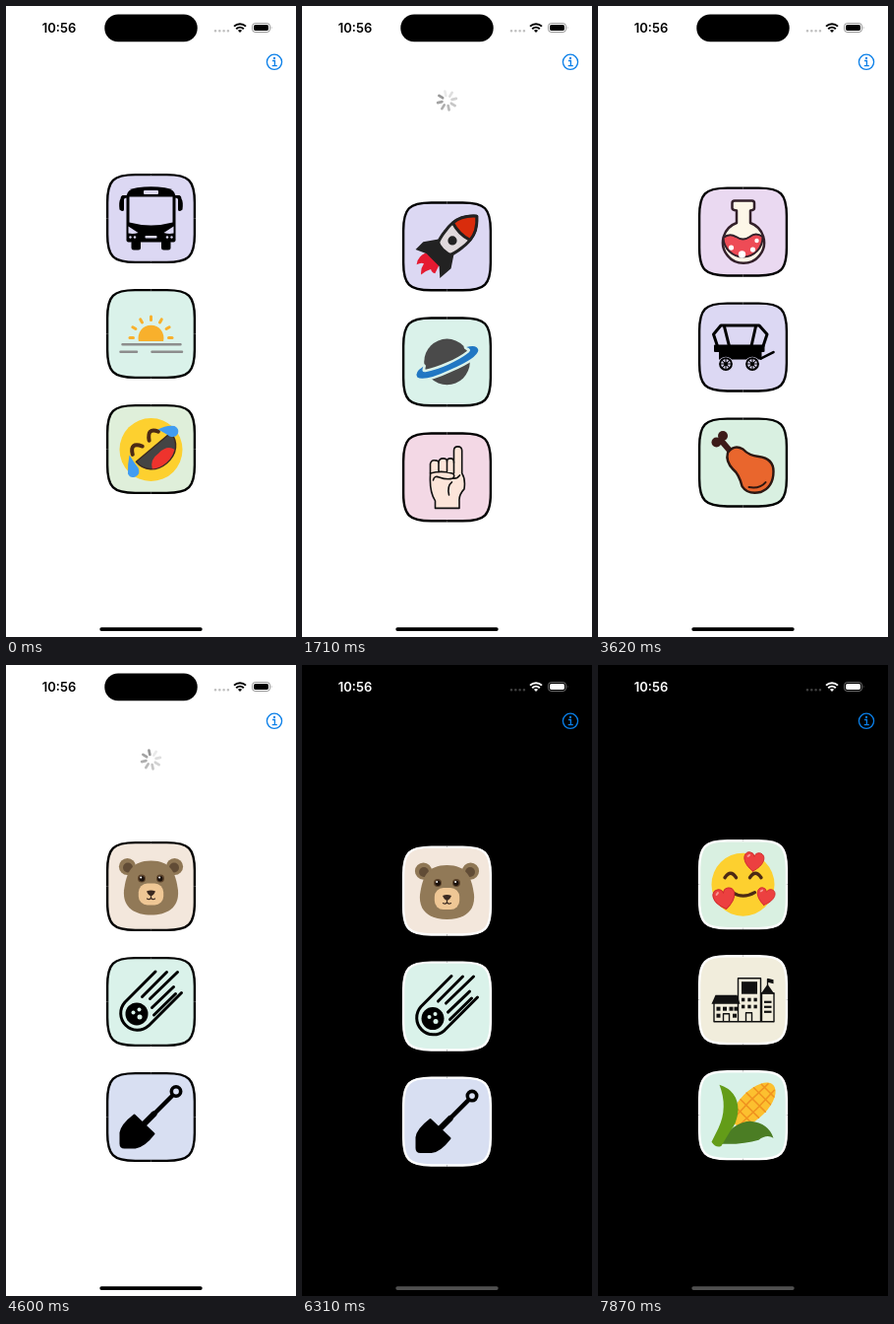
Recreate the animation shown at these times as an HTML page. Size 295 by 640 pixels, loop 7.99 s.

```html
<!DOCTYPE html>
<html lang="en">
<head>
<meta charset="utf-8">
<title>Story dice</title>
<style>
  html, body { margin: 0; width: 100%; height: 100%; overflow: hidden; background: var(--bg); }
  svg { display: block; width: 100vw; height: 100vh; }
  .ink { fill: var(--ink); }
  .line { fill: none; stroke: var(--ink); }
  .round { stroke-linecap: round; stroke-linejoin: round; }
  text { font: 600 13px Inter, sans-serif; text-anchor: middle; }
</style>
</head>
<body>
<svg viewBox="0 0 295 640">
  <g id="spinner" stroke="#858585" stroke-width="2.7" stroke-linecap="round"></g>
  <g id="dice"></g>
  <text class="ink" x="54" y="26.6">10:56</text>
  <rect x="100.3" y="8.5" width="94.4" height="27.7" rx="13.8"/>
  <path class="line round" opacity=".25" stroke-width="2.6" d="M213 25.3h0M217.3 25.3h0M221.6 25.3h0M225.9 25.3h0"/>
  <path class="line" stroke-width="2" d="M232 20.6A8.6 8.6 0 0 1 244 20.6M234.2 23.2A5.5 5.5 0 0 1 241.8 23.2"/>
  <path class="ink" d="M235.9 24.8Q238 23 240.1 24.8L238 27Z"/>
  <rect class="line" opacity=".4" x="250.5" y="17.5" width="18" height="9" rx="3"/>
  <path class="ink" opacity=".4" d="M269.8 20.5Q271.3 22 269.8 23.5Z"/>
  <rect class="ink" x="252" y="19" width="15" height="6" rx="1.7"/>
  <g fill="none" stroke="#0a7fe8" stroke-width="1.3">
    <circle cx="273" cy="56.8" r="7.6"/>
    <path d="M271 55.5H273.4V60.6M270.7 60.7H275.8"/>
    <circle cx="273" cy="52.9" r=".5"/>
  </g>
  <rect id="home" x="95.3" y="630.2" width="104.4" height="3.8" rx="1.9"/>
</svg>
<script>
const $ = id => document.getElementById(id);
const clamp = v => Math.max(0, Math.min(1, v));

// Small SVG builders; every icon is drawn around the centre of its tile.
const fill = (color, d) => `<path fill="${color}" d="${d}"/>`;
const line = (color, width, d, inside = 'none') =>
  `<path class="round" fill="${inside}" stroke="${color}" stroke-width="${width}" d="${d}"/>`;
const dot = (color, x, y, r, ry = r) => `<ellipse fill="${color}" cx="${x}" cy="${y}" rx="${r}" ry="${ry}"/>`;
const ring = (color, width, x, y, r) =>
  `<circle fill="none" stroke="${color}" stroke-width="${width}" cx="${x}" cy="${y}" r="${r}"/>`;
const box = (color, x, y, w, h, r = 0) =>
  `<rect fill="${color}" x="${x}" y="${y}" width="${w}" height="${h}" rx="${r}"/>`;
const place = (x, y, angle, content) => `<g transform="translate(${x} ${y}) rotate(${angle})">${content}</g>`;
const mirror = content => content + `<g transform="scale(-1 1)">${content}</g>`;
const repeat = (n, make) => [...Array(n)].map((_, i) => make(i)).join('');

const lavender = '#dcd8f3', mint = '#daf2ea', green = '#d9f0e1', cream = '#f1eddc';

const bus = fill('#000', 'M-25-23Q-24-30-14-31.3Q0-33 14-31.3Q24-30 25-23V22Q25 24 23 24H-23Q-25 24-25 22Z')
  + fill(lavender, 'M-22-22H22V4Q0 10-22 4Z') + box(lavender, -7.5, -28.5, 15, 4, 1)
  + box(lavender, -6, 17.5, 12, 2.6, .8)
  + mirror(box('#000', -20, 22, 9.5, 10, 2.5) + fill(lavender, 'M-23 8L-13 14.5Q-18 16-23 15Z')
    + dot(lavender, -21, 19, 1.2) + dot(lavender, -16.5, 19, 1.2)
    + fill('#000', 'M-24-23.5H-29Q-31-23-31-20Q-33-17-32-9Q-28-6-27.5-9V-19Q-27.5-21-24-21Z'));

const sunrise = fill('#f8b02c', 'M-12.6 7.5A13 13 0 1 1 12.6 7.5Z')
  + repeat(7, i => place(0, 4, i * 30 - 90, line('#f8b02c', 3, 'M0-18V-21.5')))
  + line('#8d8d8d', 2.5, 'M-29 10.7H30M-31 18.2H-14.5M1 18.2H31.5');

const laugh = dot('#fdd02f', 0, .5, 32)
  + place(2.5, -2, -40,
    line('#3b2a22', 1.5, 'M-23 0H23C23 12 14 21 0 21S-23 12-23 0Z', '#444')
    + fill('#ee332d', 'M-15 16Q-11 7 0 8Q12 7 15 15.5Q8 20.5 0 20.5Q-9 20.5-15 16Z')
    + line('#4c2a15', 4, 'M1-8Q8-20 14-9M-21-8Q-15-20-8-8'))
  + fill('#419cf0', 'M7-20Q16-25 24-23.5Q29-21 27.5-16Q25-11 19-13Q15-16 7-20Z')
  + fill('#419cf0', 'M-22 6Q-24 16-23.5 25Q-21 30-16 28Q-10 25-13 19Q-17 14-22 6Z');

const rocket = place(5.5, -6, 45,
  fill('#e51a31', 'M-10 27Q-14 36-8.5 43Q-7 38-4 37Q-3 43 2 47Q2 41 5 36Q8 38 11 36L8 27Z')
  + line('#222', 3, 'M0-35C10-26 14-14 12-2Q11 8 7 16H-7Q-11 8-12-2C-14-14-10-26 0-35Z', '#e0d9dc')
  + line('#222', 3, 'M0-35C8-28 12-21 12.3-13Q0-9-12.3-13C-12-21-8-28 0-35Z', '#d92c0c')
  + fill('#222', 'M-11 9L-20 22L-20 33L-9 28H9L18 36L19 21L11 9Q0 15-11 9Z') + dot('#222', 0, 0, 4.6));

const band = 'M-24-5.5Q-35-4-34 2Q-30 9 0 8.5Q30 9 34 2Q35-4 24-5.5Q29-1 24 .5Q14 3 0 3Q-14 3-24 .5Q-29-1-24-5.5Z';
const planet = dot('#4a4a4a', 0, 0, 23.3) + place(0, 0, -24, line(mint, 5, band) + fill('#2177c3', band));

const hand = line('#111', 1.6, 'M-12 31.5V24Q-18 15-17-2V-13.5Q-16-18-12-17Q-9-17-8.5-15Q-8-19-4-19T0-16'
    + 'Q0-19 3.5-19T7-15V-27Q7-31 11-31T15.2-27V-4Q19 2 17.5 12Q12 18 12.5 24V31.5Z', '#fce5d9')
  + line('#111', 1.6, 'M-8.5-15V-5M0-16V-5M7-15V-4M-17-4Q-6-7 5-4Q9-2 6 1Q0 3-8 0Q-13-2-14 3M6 1Q10 2 13-2M5 5Q0 9 2 18');

const flask = line('#33202a', 2.5, 'M-6.5-21.5V-9A21 21 0 1 0 7.5-9V-21.5Q11.5-22 11.5-24V-29Q11.5-31.5 9-31.5'
    + 'H-8.5Q-11-31.5-11-29V-24Q-11-22-6.5-21.5Z', '#fdf7e8')
  + line('#33202a', 2, 'M-20 6Q-14 1-7 5Q0 10 7 5Q13 0 20 5A20 20 0 1 1-20 6Z', '#ee4b56')
  + dot('#fff', -12, 16, 2.6) + dot('#fff', -1, 23, 3.7) + dot('#fff', 10, 18, 2.6) + dot('#fff', 14, 9, 2.2);

const wheel = x => dot(lavender, x, 17, 7.4) + place(x, 17, 0, ring('#000', 2, 0, 0, 5.9) + dot('#000', 0, 0, 1.8)
  + line('#000', 1.1, 'M-6 0H6M0-6V6M-4-4L4 4M-4 4L4-4'));
const wagon = line('#000', 3, 'M-26-1L-30-13L-22.5-22H16.5L24.5-13L20.5-1M-19-21L-14-1M13-21L8.5-1')
  + box('#000', -29.5, -2.5, 51.5, 7.5, 1) + box('#000', -24.5, 4, 43.5, 8.5) + line('#000', 2.6, 'M18 11.5L31 5')
  + wheel(-17.5) + wheel(9.5);

const drumstick = line('#3d1b19', 6, 'M-10-8L-22-22') + dot('#3d1b19', -20.5, -27, 5) + dot('#3d1b19', -27, -20.5, 5)
  + line('#2c1712', 2.4, 'M-15.5-10Q-9-19 0-13.5Q6-7 16-6Q31-4 31 9Q31 25 18 30Q5 33-1 24Q-4 12-10 7Q-18-1-15.5-10Z', '#e9662d')
  + line('#2c1712', 2, 'M6 25Q17 27 23 20');

const bear = mirror(dot('#8f7755', -24, -20, 8.6) + dot('#614c36', -23.5, -19, 5))
  + fill('#917957', 'M0-26C20-26 25-14 27.5 4C29 22 16 29 0 29S-29 22-27.5 4C-25-14-20-26 0-26Z')
  + box('#efc795', -12.7, -3, 25.4, 22, 9)
  + mirror(dot('#5c432b', -9.5, -8, 4) + dot('#1c120c', -9.3, -7.8, 2.7)) + dot('#fff', -10.3, -9, 1) + dot('#fff', 8.6, -9, 1)
  + fill('#3a2920', 'M-4.5 5Q0 3 4.5 5Q3 9 0 10Q-3 9-4.5 5Z') + line('#3a2920', 1.2, 'M0 10V12M-4 12.5Q-2 14 0 12Q2 14 4 12.5');

const comet = line('#000', 3, 'M4.5-30.5L-26.5 .5A17 17 0 0 0-2.5 24.5L31-9M-9-5L16-30M-1-3L27-30M1 6L23-15M3 13.5L25-8')
  + dot('#000', -14.5, 12.5, 11.5) + dot(mint, -18, 11, 2) + dot(mint, -12, 8, 2) + dot(mint, -11.5, 15.5, 2.5);

const shovel = ring('#000', 3.6, 25.5, -26, 4.7) + line('#000', 4.5, 'M21-21L-7 7') + line('#000', 6, 'M3-3L-7 7')
  + line('#000', 2, 'M-17-2L3 17Q-7 30-16 31H-27Q-31 31-31 27V16Q-30 8-17-2Z', '#000');

const heart = (x, y, angle, size) => place(x, y, angle, `<g transform="scale(${size})">`
  + line('#cf2c2f', .9, 'M0 10C-14 1-11-9-5-9Q-1-9 0-5Q1-9 5-9C11-9 14 1 0 10Z', '#ec4040')
  + line('#f79a95', 1.8, 'M-6.5-4.5L-5-6') + '</g>');
const love = dot('#fdd02f', 0, 0, 32)
  + mirror(line('#4c2a15', 3.4, 'M-18.5-7Q-12.5-16-7-7')) + line('#4c2a15', 3.2, 'M-11 8Q0 15 12 8')
  + heart(11, -23.5, 6, 1) + heart(-19, 14, -10, 1.1) + heart(23, 12, 12, .9);

const grid = (xs, ys, w, h) => ys.flatMap(y => xs.map(x => box('#111', x, y, w, h))).join('');
const school = line('#111', 1.4, 'M-5 22V-22H18V22M19 22V-7H31.5V22M-29.5 3V22H31.5M3 22V13H9V22M-20 22V14H-14V22')
  + box('#111', -1.5, -18.5, 16, 12.5) + grid([-1.5, 4.8, 11], [-2, 5], 3.3, 3.6)
  + fill('#111', 'M-28-5H-6L-3 4H-32Z') + grid([-27, -20.5, -14, -9], [7], 4, 4) + grid([-27, -10.5], [14], 4, 4)
  + fill('#111', 'M18-6L25-16L32-6Z') + line('#111', 1.3, 'M25-15V-21') + fill('#111', 'M25-22L31-20.5V-16.5L25-18Z')
  + grid([21.5], [1, 6, 11], 7.5, 2.2);

const corn = place(11, -11, -45, dot('#fcc02f', 0, 0, 28, 14)
    + line('#f0921f', 1.5, 'M-26-4.5Q0-6 25-4.5M-26 4.5Q0 6 25 4.5M-15-11V11M-6-13V13M3-13.5V13.5M12-12V12M20-9V9'))
  + fill('#4b7d24', 'M-24 29Q-10 6 8 6Q26 8 31 23Q24 19 16 25Q0 30-24 29Z')
  + fill('#639c18', 'M-24-31Q-5-25-5-5Q-6 8-13 16L-22 31Q-27 34-32 27L-25 13Q-15-8-24-31Z');

const sets = [
  [[lavender, bus], [mint, sunrise], ['#dfefda', laugh]],
  [[lavender, rocket], [mint, planet], ['#f3d8e5', hand]],
  [['#ead9f1', flask], [lavender, wagon], [green, drumstick]],
  [['#f3e7dc', bear], [mint, comet], ['#d8dff2', shovel]],
  [[green, love], [cream, school], ['#d8f1e8', corn]]
];
const corner = 'M0-44.4H16C38.5-44.4 44.4-38.5 44.4-16V0';
const squircle = repeat(4, i => place(0, 0, i * 90, `<path class="line" stroke-width="2.4" d="${corner}"/>`));
$('dice').innerHTML = sets.map(set => '<g>' + set.map(([color, icon], i) => place(147.5, 215.5 + 117 * i, 0,
  box(color, -44, -44, 88, 88, 17) + squircle + icon)).join('') + '</g>').join('');
$('spinner').innerHTML = repeat(8, i => `<path d="M0-5.2V-9.6" transform="rotate(${i * 45})"/>`);

const LOOP = 7990, STEP = 108.4, PEAK = 153, RISE = 420, TRIGGER = 300;
const pulls = [[880, 1532], [2140, 2794], [3543, 4298], [6233, 6928], [7815, 9000]];  // start, release
const runs = [[950, 23], [3620, 12], [5080, 4], [6310, 12], [7870, 0]];               // start, steps

// The picture advances in even steps within each run and holds in between.
function poseTime(t) {
  const run = runs.findLast(([start]) => start <= t);
  return run ? run[0] + STEP * Math.min(run[1], Math.floor((t - run[0]) / STEP)) : 0;
}

function pullOffset(t, [start, release]) {
  if (t > release) return PEAK * Math.exp((release - t) / 105);
  const u = clamp((t - start) / RISE);
  return PEAK * u * u * (3 - 2 * u);
}

function drawSpinner(sinceRelease, triggered, offset) {
  const turn = 10 * clamp(sinceRelease / 180) - 22.5;
  $('spinner').setAttribute('transform', `translate(147.5 96) rotate(${turn})`);
  const head = Math.round(4.3 + sinceRelease / 78);
  const fade = .85 * clamp((480 - sinceRelease) / 180);
  const low = sinceRelease > 60 ? .2 : .55;
  [...$('spinner').children].forEach((tick, i) => {
    const age = ((head - i) % 8 + 8) % 8;
    tick.style.opacity = triggered ? fade * (1 - (1 - low) * age / 7) : clamp((offset - 35) / 11 - i) * .7;
  });
}

function draw(t) {
  const pull = pulls.findLast(([start]) => start <= t);
  const offset = pull ? pullOffset(t, pull) : 0;
  const shown = pulls.filter(([start]) => t >= start + TRIGGER).length;
  $('dice').setAttribute('transform', `translate(0 ${offset < .5 ? 0 : offset})`);
  [...$('dice').children].forEach((g, i) => g.style.display = i === shown ? '' : 'none');
  drawSpinner(pull ? t - pull[1] : 1e4, pull && t >= pull[0] + TRIGGER, offset);

  const dark = clamp((t - 5000) / 500);
  const gray = v => `rgb(${v},${v},${v})`;
  const root = document.documentElement.style;
  root.setProperty('--ink', gray(255 * dark));
  root.setProperty('--bg', gray(255 * (1 - dark)));
  $('home').setAttribute('fill', gray(80 * dark));
}

function tick() {
  draw(poseTime(performance.now() % LOOP));
  requestAnimationFrame(tick);
}
tick();
</script>
</body>
</html>
```
